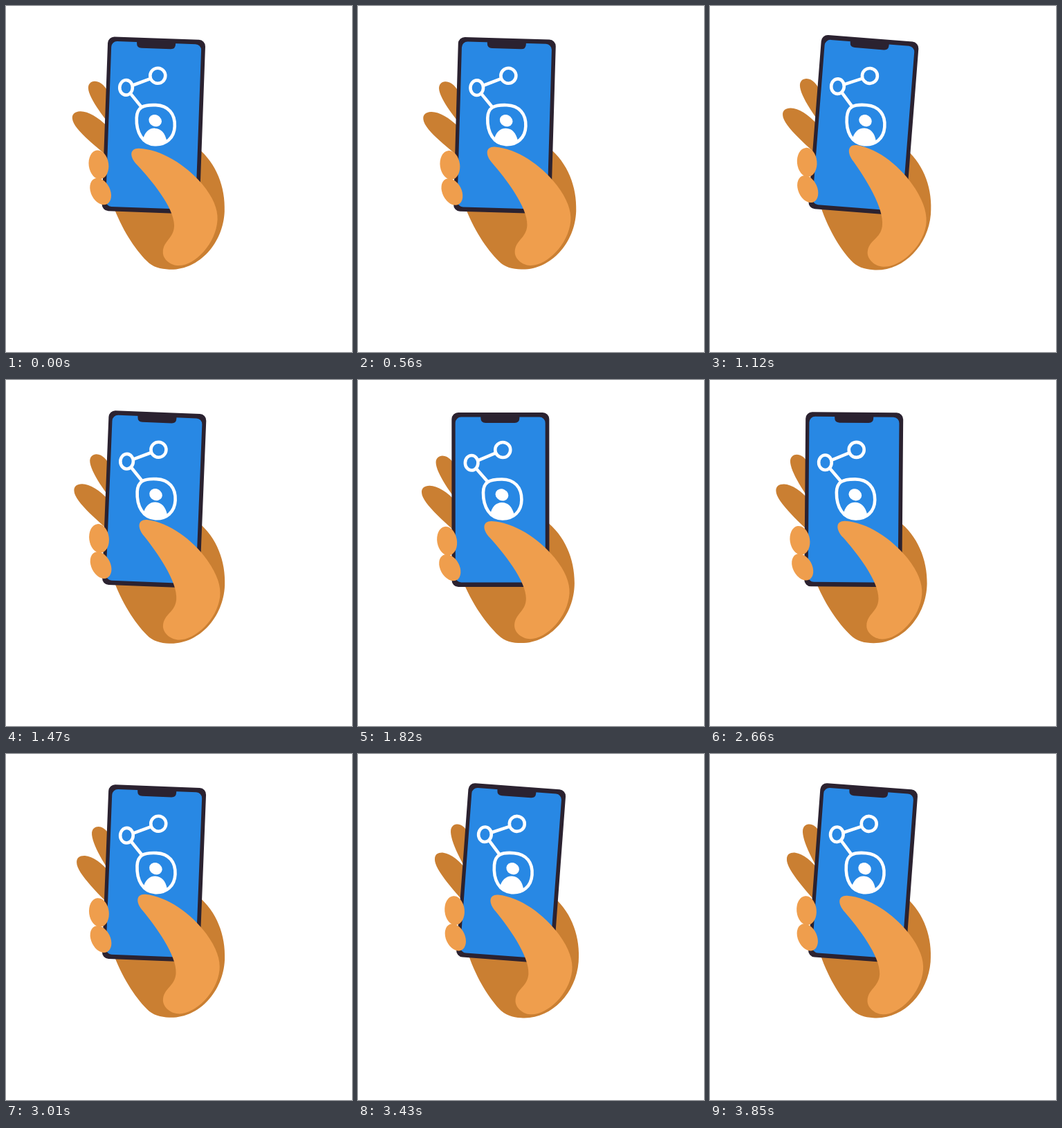
Recreate the animation shown at these times as an HTML page. Size 500 px wide and 500 px high, loop 3920 ms.

```html
<!DOCTYPE html>
<html lang="en">
<head>
<meta charset="utf-8">
<title>Hand holding a phone</title>
<style>
  html, body { margin: 0; width: 100%; height: 100%; overflow: hidden; background: #fff; }
  svg { display: block; width: 100vw; height: 100vh; }
  .back { fill: #ca7f32; }
  .front { fill: #ef9e4d; }
  .line { fill: none; stroke: #fff; stroke-width: 4.6; }
</style>
</head>
<body>
<svg viewBox="0 0 500 500">
  <g id="hand">
    <path id="index" class="back" d="M122 109C131 109 138 118 143 130L158 165L150 186C136 168 112 134 112.500 118C113 112 117 109 122 109Z"/>
    <path id="middle" class="back" d="M104 152C115 152 130 162 142 176L170 212L160 238C128 208 93 178 92.500 162C92 155 97 152 104 152Z"/>
    <path class="back" d="M150 288C165 325 185 352 203 369C212 378 224 380 236 380C278 380 312.500 340 312.500 293C312.500 258 298 224 270 203L200 200Z"/>
    <g transform="rotate(-.3 205 173)">
      <rect x="134.500" y="47" width="141" height="252" rx="9.500" fill="#2b2230"/>
      <rect x="139.800" y="53.500" width="130" height="239" rx="8.500" fill="#2888e4"/>
      <path fill="#2b2230" d="M176.500 50H232.500V55Q232.500 62 225.500 62H183.500Q176.500 62 176.500 55Z"/>
    </g>
    <circle class="line" cx="208" cy="101" r="11"/>
    <ellipse class="line" cx="163" cy="120" rx="9.300" ry="10.800"/>
    <path class="line" d="M172 116.500L198 105.500M169 127.500L187.500 148.500"/>
    <path class="line" d="M207 143.500C225 143.500 235.500 155 235.500 173C235.500 190 224 200.500 208 200.500C190 200.500 180 184 180 163C180 148 188 143.500 207 143.500Z"/>
    <ellipse cx="207" cy="166" rx="9.600" ry="8.300" transform="rotate(25 207 166)" fill="#fff"/>
    <path fill="#fff" d="M190 196C192 183 199 177 207 177C216 177 222 183 225 195C219 200 214 201.500 208 201.500C200 201.500 195 200 190 196Z"/>
    <ellipse class="front" cx="128" cy="233" rx="14.300" ry="21" transform="rotate(-10 128 233)"/>
    <ellipse class="front" cx="132.300" cy="271.500" rx="13.800" ry="20.500" transform="rotate(-29 132.300 271.500)"/>
    <path id="thumb" class="front" d="M190 205C222 206 258 228 282 256C298 275 305 292 304.500 307C303 342 272 374 249 374C237 374 226 365 226 355C226 338 242 335 242 316C242 290 207 249 188 229C176 217 177 205 190 205Z"/>
  </g>
</svg>
<script>
const LOOP = 3920, STEP = 70;

// Keys are [time in ms, angle in degrees]
const swing = [[0, 2.36], [300, .7], [1010, 4.95], [1960, 0], [2300, 0], [3700, 5], [LOOP, 4.4]];
const curl = [[0, -6], [1000, -6], [2240, 0], [3000, 0], [3500, 1.2], [LOOP, 1.2]];
const press = [[0, -2], [1080, 3], [2240, 0], [2900, 1.5], [LOOP, -2.1]];

const parts = [
  ['hand', swing, 220, 375],
  ['index', curl, 155, 160],
  ['middle', curl, 150, 215],
  ['thumb', press, 245, 355]
].map(([id, keys, x, y]) => ({ el: document.getElementById(id), keys, x, y }));

function valueAt(keys, t) {
  const i = keys.findIndex(key => key[0] > t);
  const [t0, a] = keys[i - 1], [t1, b] = keys[i];
  return a + (b - a) * (1 - Math.cos(Math.PI * (t - t0) / (t1 - t0))) / 2;
}

function draw(now) {
  const t = Math.floor(now % LOOP / STEP) * STEP;
  for (const { el, keys, x, y } of parts)
    el.setAttribute('transform', `rotate(${valueAt(keys, t)} ${x} ${y})`);
}

function tick() {
  draw(performance.now());
  requestAnimationFrame(tick);
}
tick();
</script>
</body>
</html>
```
